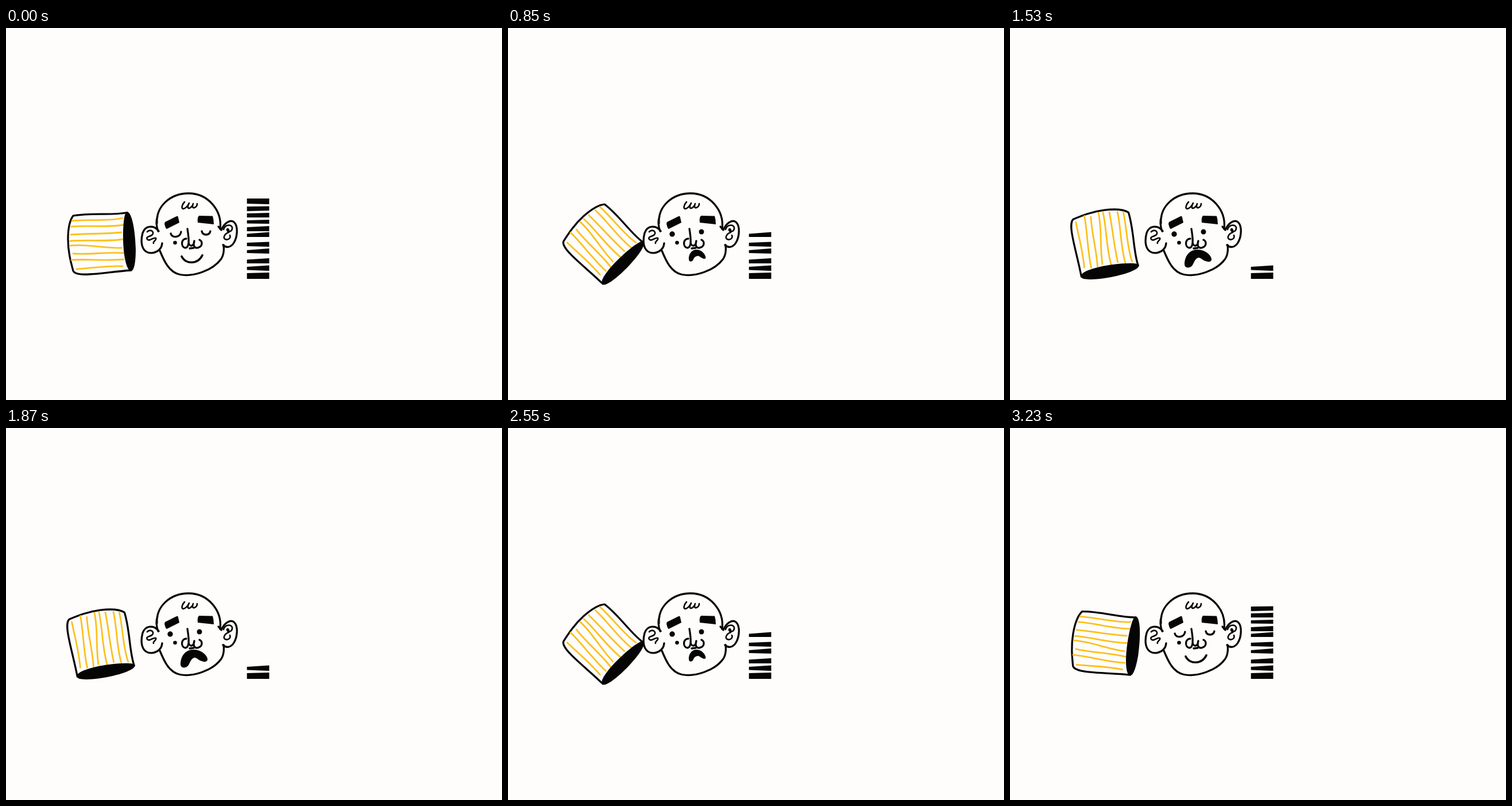
An HTML page that plays this animation: 864x648 px, repeating every 3400 ms.

```html
<!DOCTYPE html>
<html>
<head>
<meta charset="utf-8">
<style>
html, body { margin: 0; width: 100%; height: 100%; overflow: hidden; background: #fefdfb; }
svg { display: block; width: 864px; height: 648px; }
.ink { fill: none; stroke: #060506; stroke-width: 3.3; stroke-linecap: round; stroke-linejoin: round; }
.solid { fill: #060506; }
.stripes { fill: none; stroke: #fdc01c; stroke-width: 2.8; stroke-linecap: round; }
.thin { stroke-width: 2.6; }
</style>
</head>
<body>
<svg viewBox="0 0 864 648">
  <g id="hat">
    <path class="ink" style="fill:#fdfdfd" d="M211 321.5C185 327 150 321 117 327C111 335 108 350 108 368C108 390 113 408 117 423C119 428 130 430 145 429C165 428 190 424 218 422"/>
    <path class="stripes" d="M115 336C140 333 180 337 203 331M114 346C140 343 175 348 204 343M113 360C140 358 170 359 201 356M112 371C140 368 170 373 204 368M112 379C140 376 170 384 201 383M117 393C145 395 175 390 205 392M114 404C140 402 175 406 205 403M123 420C150 418 175 414 203 415"/>
    <path class="solid" d="M211 320C219 321 225 350 226 385C226 410 223 423 218 423C210 424 204 395 204 365C204 340 206 320 211 320Z"/>
  </g>

  <g class="ink">
    <path d="M264 328C261 336 262 346 265 354M263 340C261 311 286 288 318 288C351 288 377 317 373 350"/>
    <path d="M268 388C275 405 284 426 303 429.500C325 434 360 423 375 402C380 394 380 386 379 378"/>
    <path d="M266 354C258 343 243 343 238 357C234 372 236 387 247 391C258 394 271 388 272 375"/>
    <path d="M370 346L375 352C380 340 390 333 397 338C405 345 403 364 397 374C392 382 384 384 378 378"/>
    <path class="thin" d="M246 355C251 350 259 354 255 360C251 364 243 363 246 368C250 373 256 364 261 366C263 370 255 372 257 375"/>
    <path class="thin" d="M379 351C381 343 391 341 394 347C395 355 386 357 385 352C385 348 389 350 388 356C381 358 377 366 382 368C387 370 392 366 390 361"/>
    <path class="thin" d="M311 303C306 308 305 315 309 315C313 314 317 309 319 305C316 310 316 314 319 314C323 313 326 308 326 306C324 311 325 314 328 313C331 312 333 309 333 306"/>
    <path d="M314 367C305 367 304 381 312 383C320 383 319 368 316 350M318 371C318 382 327 382 328 371C325 381 330 385 336 382C343 379 342 371 337 369M320 384L327 383"/>
  </g>
  <g class="solid">
    <path d="M277 338L297 328Q300 327 300 330L302 339L280 350Q278 350 276 341Z"/>
    <path d="M336 327L360 327.500Q362 334 362 342L334 339Q333 330 336 327Z"/>
    <circle cx="294.500" cy="374" r="3.300"/>
  </g>

  <g class="face ink">
    <path d="M287 358C289 366 303 366 305 355M341 354C343 362 354 362 356 354"/>
    <path d="M306 398C313 412 334 412 342 396" stroke-width="3.700"/>
  </g>
  <g class="face solid">
    <ellipse cx="295" cy="356" rx="3.800" ry="6.500"/>
    <ellipse cx="348" cy="354" rx="3.800" ry="6.500"/>
    <ellipse cx="322.500" cy="402.500" rx="5" ry="6"/>
  </g>
  <g class="face solid">
    <circle cx="286" cy="359" r="4.700"/>
    <circle cx="337" cy="355" r="4.500"/>
    <path d="M315 403C314 395 320 386 328 386C338 386 344 395 344.500 400C343 405 337 400 332 397C326 397 324 400 322 405C319 408 315 407 315 403Z"/>
  </g>
  <g class="face solid">
    <circle cx="286" cy="359" r="4.700"/>
    <circle cx="337" cy="355" r="4.500"/>
    <path d="M304 412C304 398 312 386 327 386C344 387 352 399 351 404C349 409 344 407 341 406C336 405 333 400 328 400C322 402 321 408 318 413C315 418 305 420 304 412Z"/>
  </g>
  <g id="bars" class="solid"></g>
</svg>
<script>
// Each bar: left top, left bottom, right top, right bottom
const BARS = [
  [297, 306, 297, 307], [311, 319, 310.5, 318], [323, 330, 322, 330], [335, 340.5, 334, 341],
  [347, 354, 345, 354], [358.5, 364, 355.5, 364], [374, 380, 372.5, 381], [387, 392, 384, 393],
  [403.5, 410, 401, 410], [416, 421.5, 413.5, 423], [427, 437, 426, 437]
];
const ANGLES = [0, 9.5, 18, 25, 37, 48, 58, 67, 75, 83, 90];
const STEP = 170, STEPS = 20;
const hat = document.getElementById("hat");
const faces = document.querySelectorAll(".face");
const group = document.getElementById("bars");

group.innerHTML = BARS.map(([a, b, c, d]) =>
  `<path d="M419.700 ${a}L458.500 ${c}V${d}L419.700 ${b}Z"/>`).join("");
const bars = [...group.children];
const show = (el, on) => { el.style.display = on ? "" : "none"; };

function draw() {
  const n = Math.floor(performance.now() / STEP) % STEPS;
  const k = Math.min(n, STEPS - n);
  const mood = Math.floor((k + 1) / 3);
  hat.setAttribute("transform", `rotate(${ANGLES[k]} 165 374.5)`);
  faces.forEach((el, i) => show(el, i === Math.min(mood, 3)));
  bars.forEach((el, i) => show(el, i >= Math.min(k, 9)));
  requestAnimationFrame(draw);
}
draw();
</script>
</body>
</html>
```
